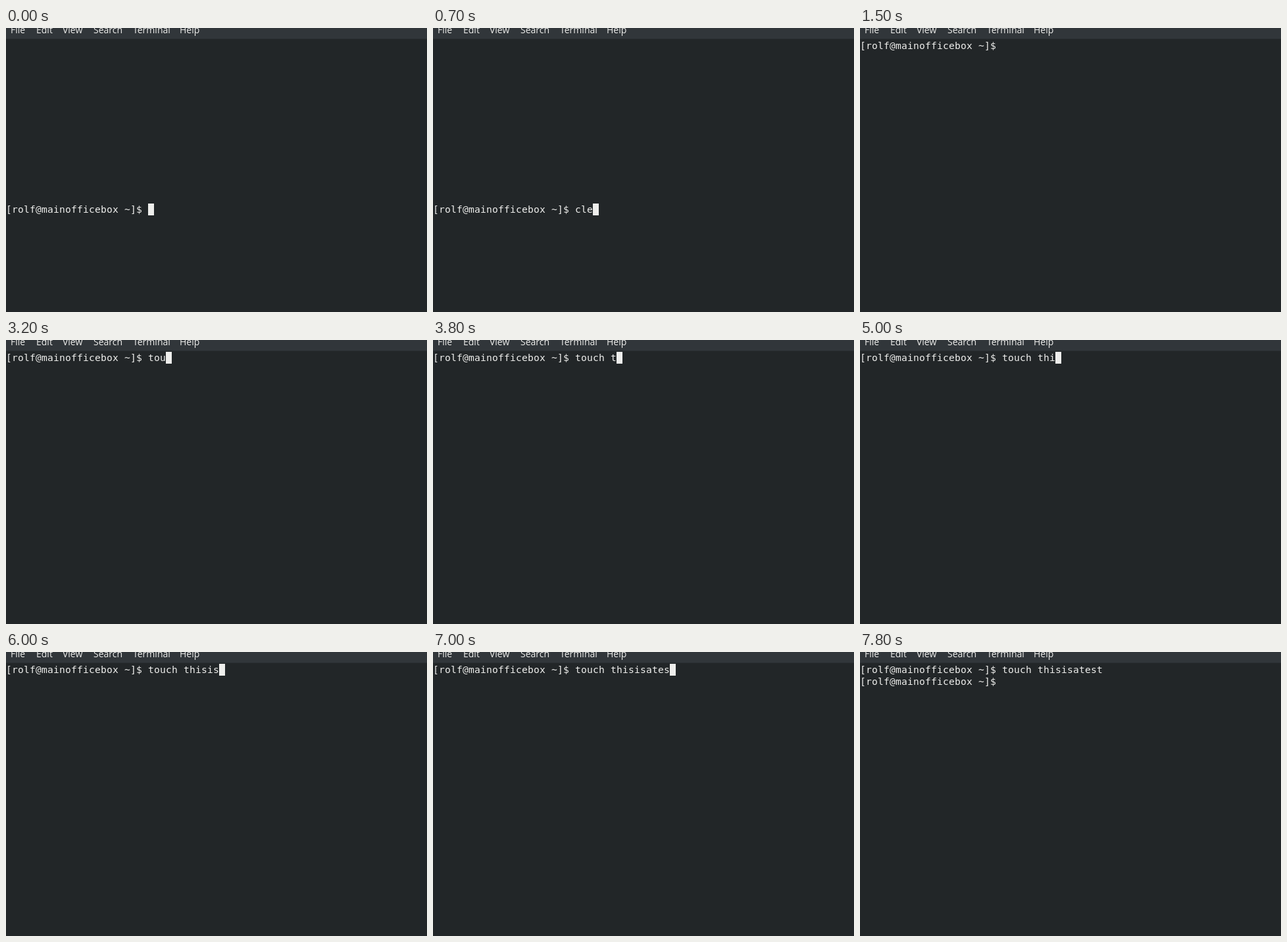
These frames come from a looping animation (640 by 432 pixels, 8000 ms). An HTML page with a canvas:

```html
<!DOCTYPE html>
<html lang="en">
<head>
<meta charset="utf-8">
<title>Terminal</title>
<style>
  html, body { margin: 0; height: 100%; overflow: hidden; background: #222628; }
  canvas { display: block; }
</style>
</head>
<body>
<canvas id="stage" width="640" height="432"></canvas>
<script>
const ctx = document.getElementById('stage').getContext('2d');
const LOOP = 8000, CELL = 9, ROW = 18;
const PROMPT = '[rolf@mainofficebox ~]$ ';
const MENU = { File: 7, Edit: 46, View: 86, Search: 133, Terminal: 193, Help: 264 };

// Key presses as [time, keys, gap between keys]; "<" is backspace, "\n" is enter.
const KEYS = [
  [500, 'clear\n'], [2900, 'to', 0], [3200, 'uch '], [3800, 't'], [4000, 'ih'],
  [4400, '<'], [4600, '<'], [4800, 'h'], [5000, 'i'], [5200, 's'], [5500, 'i'],
  [6000, 's'], [6300, 'a'], [6700, 'te'], [7000, 's'], [7200, 't\n']
].flatMap(([time, keys, gap = 100]) => [...keys].map((key, i) => [time + i * gap, key]));

// Spans in which the blinking cursor is hidden.
const HIDDEN = [[1500, 2100], [2700, 2900], [7800, 8000]];

function screenAt(t) {
  let top = 267, lines = [''];
  for (const [time, key] of KEYS) {
    if (time > t) break;
    const last = lines.length - 1;
    if (key === '<') lines[last] = lines[last].slice(0, -1);
    else if (key !== '\n') lines[last] += key;
    else if (lines[last] === 'clear') { top = ROW; lines = ['']; }
    else lines.push('');
  }
  return { top, lines };
}

function draw(t) {
  ctx.fillStyle = '#222628';
  ctx.fillRect(0, 0, 640, 432);
  ctx.fillStyle = '#31363a';
  ctx.fillRect(0, 0, 640, 16);
  ctx.fillStyle = '#2a2f32';
  ctx.fillRect(0, 16, 640, 1);

  ctx.fillStyle = '#eeeeec';
  ctx.font = '14px "Open Sans", "Noto Sans", sans-serif';
  for (const label in MENU) ctx.fillText(label, MENU[label], 8);

  ctx.font = '11pt "DejaVu Sans Mono", monospace';
  const { top, lines } = screenAt(t);
  lines.forEach((line, row) => {
    [...PROMPT + line].forEach((char, col) => ctx.fillText(char, col * CELL, top + row * ROW + 14));
  });
  if (HIDDEN.some(([from, to]) => t >= from && t < to)) return;
  const row = lines.length - 1;
  ctx.fillRect((PROMPT + lines[row]).length * CELL, top + row * ROW, CELL, ROW);
}

function tick() {
  draw(performance.now() % LOOP);
  requestAnimationFrame(tick);
}
tick();
</script>
</body>
</html>
```
